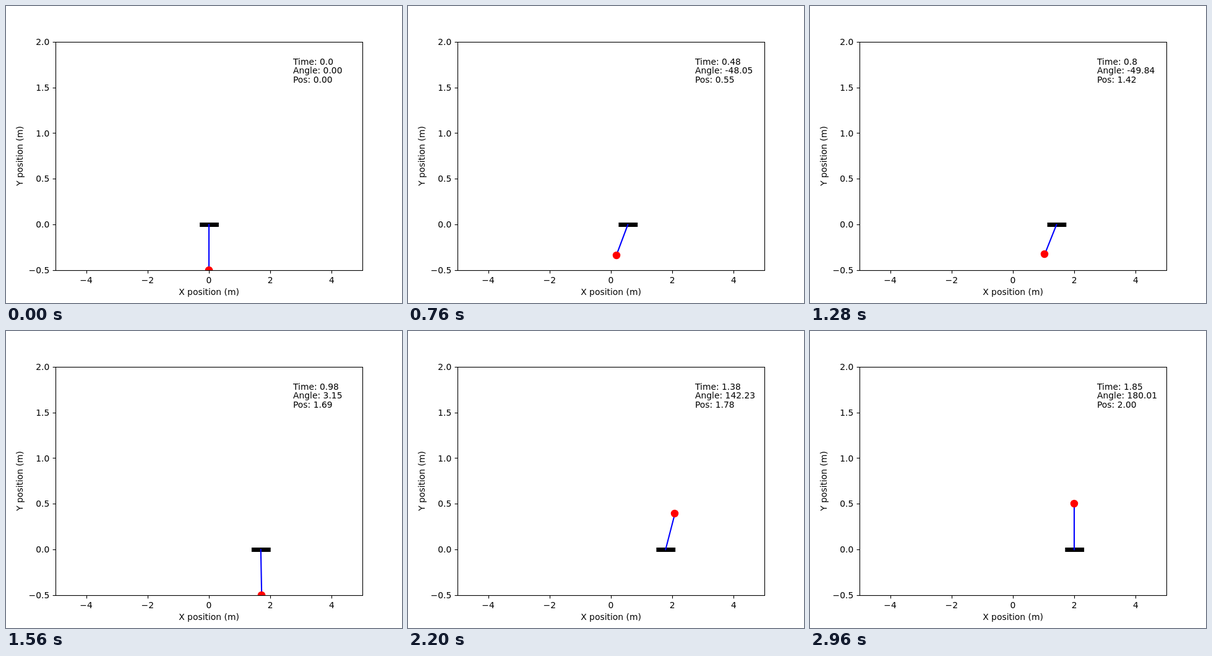
These frames come from a looping animation (640 px wide and 480 px high, 3 s). An HTML page with a canvas:

```html
<!DOCTYPE html>
<html lang="en">
<head>
<meta charset="utf-8">
<title>Cart-pole swing-up</title>
<style>
  html, body { margin: 0; width: 100%; height: 100%; overflow: hidden; background: #fff; }
  canvas { display: block; }
</style>
</head>
<body>
<canvas id="stage" width="640" height="480"></canvas>
<script>
const ctx = document.getElementById('stage').getContext('2d');
const STEP = 40, STEPS = 75, DT = 0.025, POLE = 0.5;
const BOX = { x: 80, y: 57.6, w: 496, h: 369.6 };
const FONT = '13.89px "DejaVu Sans", sans-serif';

const px = x => BOX.x + (x + 5) * BOX.w / 10;
const py = y => BOX.y + (2 - y) * BOX.h / 2.5;

// time (s), cart position (m), cart speed, pole angle (deg), angular speed
const KEYS = [
  [0,     0,     0,    0,      0],
  [0.3,   0.16,  1.5,  -17.01, -149],
  [0.475, 0.55,  2.75, -48.05, -172],
  [0.8,   1.42,  2.35, -49.84, 172],
  [0.975, 1.69,  0.5,  3.15,   435],
  [1.05,  1.708, 0.05, 38,     470],
  [1.375, 1.78,  0.48, 142.23, 172],
  [1.85,  2,     0,    180.01, 0]
];

function hermite(a, b, t, i) {
  const h = b[0] - a[0], s = (t - a[0]) / h, r = 1 - s;
  return r * r * ((1 + 2 * s) * a[i] + s * h * a[i + 1])
       + s * s * ((1 + 2 * r) * b[i] - r * h * b[i + 1]);
}

function poseAt(t) {
  let n = 1;
  while (n < KEYS.length - 1 && t > KEYS[n][0]) n++;
  const a = KEYS[n - 1], b = KEYS[n];
  return { pos: hermite(a, b, t, 1), angle: hermite(a, b, t, 3) };
}

function text(str, x, y, align = 'left') {
  ctx.textAlign = align;
  ctx.fillText(str, x, y);
}

function line(x1, y1, x2, y2) {
  ctx.beginPath();
  ctx.moveTo(x1, y1);
  ctx.lineTo(x2, y2);
  ctx.stroke();
}

const snap = v => Math.round(v) + 0.5;

function drawAxes() {
  ctx.strokeStyle = ctx.fillStyle = '#000';
  ctx.lineWidth = 1.11;
  ctx.lineCap = 'butt';
  ctx.strokeRect(80.5, 58.5, 496, 369);
  for (let v = -4; v <= 4; v += 2) {
    const x = snap(px(v));
    line(x, 427.5, x, 432.4);
    text(String(v).replace('-', '\u2212'), px(v), 448, 'center');
  }
  for (let v = -0.5; v <= 2; v += 0.5) {
    const y = snap(py(v));
    line(75.6, y, 80.5, y);
    text(v.toFixed(1).replace('-', '\u2212'), 70.3, Math.round(py(v) + 5.1), 'right');
  }
  text('X position (m)', 328, 467, 'center');
  ctx.save();
  ctx.translate(27, 242.4);
  ctx.rotate(-Math.PI / 2);
  text('Y position (m)', 0, 0, 'center');
  ctx.restore();
}

function drawCart({ pos, angle }) {
  const rad = angle * Math.PI / 180;
  let x1 = px(pos), x2 = px(pos + POLE * Math.sin(rad));
  const y1 = py(0), y2 = py(-POLE * Math.cos(rad));
  ctx.save();
  ctx.beginPath();
  ctx.rect(BOX.x, BOX.y, BOX.w, BOX.h);
  ctx.clip();
  ctx.fillStyle = '#000';
  ctx.fillRect(x1 - 14.88, 350, 30.76, 7);
  // keep an upright pole crisp
  if (Math.abs(x2 - x1) < 0.1) x1 = x2 = Math.round(x1);
  ctx.strokeStyle = '#00f';
  ctx.lineWidth = 2.08;
  ctx.lineCap = 'square';
  line(x1, y1, x2, y2);
  ctx.fillStyle = '#f00';
  ctx.beginPath();
  ctx.arc(Math.round(x2), Math.round(y2), 6.25, 0, 2 * Math.PI);
  ctx.fill();
  ctx.restore();
}

// two decimals, halves to even, at least one decimal shown
function clock(step) {
  const c = step * 2.5, f = Math.floor(c);
  const n = c === f ? c : f + f % 2;
  return n % 100 ? String(n / 100) : (n / 100).toFixed(1);
}

function draw(step) {
  const pose = poseAt(step * DT);
  ctx.fillStyle = '#fff';
  ctx.fillRect(0, 0, 640, 480);
  ctx.font = FONT;
  drawCart(pose);
  drawAxes();
  text('Time: ' + clock(step), 464, 95);
  text('Angle: ' + pose.angle.toFixed(2), 464, 109);
  text('Pos: ' + pose.pos.toFixed(2), 464, 124);
}

function tick() {
  draw(Math.floor(performance.now() / STEP) % STEPS);
  requestAnimationFrame(tick);
}
tick();
</script>
</body>
</html>
```
